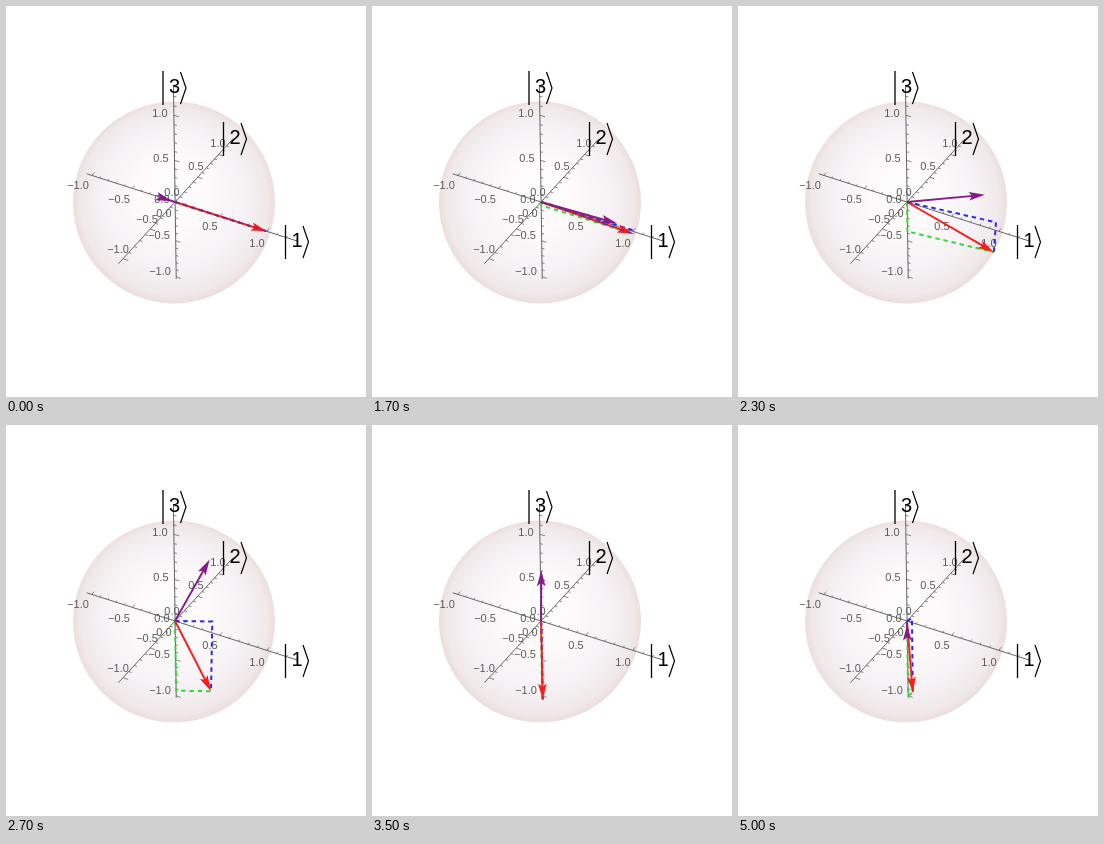
Recreate the animation shown at these times as an HTML page with a canvas. Size 360 by 391 pixels, loop 5.1 s.

```html
<!DOCTYPE html>
<html lang="en">
<head>
<meta charset="utf-8">
<title>State vector on a sphere</title>
<style>
html, body { margin: 0; width: 100%; height: 100%; overflow: hidden; background: #fff; }
canvas { display: block; }
</style>
</head>
<body>
<canvas id="stage" width="360" height="391"></canvas>
<script>
const ctx = document.getElementById('stage').getContext('2d');
const STEP_MS = 100, STEPS = 51;
const ORIGIN = [169, 196], SCALE = 99.5, DISTANCE = 8;
const FONT = '"Liberation Sans", Arial, sans-serif';

// Perspective view from the direction (1.3, -2.4, 2).
function project([x, y, z]) {
  const depth = 0.384 * x - 0.709 * y + 0.5905 * z;
  const k = SCALE / (1 - depth / DISTANCE);
  return [
    ORIGIN[0] + k * (0.879 * x + 0.476 * y) - 1.2 * z,
    ORIGIN[1] + k * (0.281 * x - 0.519 * y - 0.807 * z)
  ];
}

// Two Gaussian pulses drive a three-level system.
const stokes = n => Math.exp(-((n - 20) ** 2) / 50);
const pump = n => Math.exp(-((n - 30) ** 2) / 50);
const RATE = 2 * Math.PI / 5;

function slope(n, [x, y, z]) {
  const s = RATE * stokes(n), p = RATE * pump(n);
  return [-p * y, p * x + s * z, -s * y];
}

function advance(n, r, h) {
  const move = (d, f) => r.map((v, i) => v + d[i] * f);
  const a = slope(n, r);
  const b = slope(n + h / 2, move(a, h / 2));
  const c = slope(n + h / 2, move(b, h / 2));
  const d = slope(n + h, move(c, h));
  return r.map((v, i) => v + h / 6 * (a[i] + 2 * b[i] + 2 * c[i] + d[i]));
}

const states = [[1, 0, 0]];
for (let n = 0; n < STEPS - 1; n++) {
  let r = states[n];
  for (let j = 0; j < 20; j++) r = advance(n + j / 20, r, 1 / 20);
  states.push(r);
}

function stroke(points, color, width, dash = []) {
  ctx.beginPath();
  points.forEach(p => ctx.lineTo(p[0], p[1]));
  ctx.strokeStyle = color;
  ctx.lineWidth = width;
  ctx.setLineDash(dash);
  ctx.stroke();
  ctx.setLineDash([]);
}

function text(str, x, y, size, color) {
  ctx.font = size + 'px ' + FONT;
  ctx.textAlign = 'center';
  ctx.textBaseline = 'middle';
  ctx.fillStyle = color;
  ctx.fillText(str, x, y);
}

function drawSphere() {
  const g = ctx.createRadialGradient(166, 182, 0, 168, 196, 101);
  g.addColorStop(0, '#fefdfe');
  g.addColorStop(0.35, '#fcfafb');
  g.addColorStop(0.7, '#f6f2f5');
  g.addColorStop(0.92, '#f1e9ea');
  g.addColorStop(1, '#ebdfdd');
  ctx.fillStyle = g;
  ctx.beginPath();
  ctx.arc(168, 196.5, 101, 0, 2 * Math.PI);
  ctx.fill();
}

// Each label run lists the centres for -1.0, -0.5, 0.0, 0.5 and 1.0.
const AXES = [
  { dir: 0, tick: 1, from: -1.06, to: 1.32,
    labels: [[72, 179], [113, 193], [158, 207], [204, 220], [251, 237]] },
  { dir: 1, tick: 0, from: -1.08, to: 1.37,
    labels: [[112, 243], [141, 213], [166, 186], [190, 160], [212, 137]] },
  { dir: 2, tick: 0, from: -1.03, to: 1.3,
    labels: [[154, 265], [153, 229], [156, 193], [155, 152], [154, 107]] }
];

function drawAxis({ dir, tick, from, to, labels }) {
  const at = (v, off = 0) => {
    const p = [0, 0, 0];
    p[dir] = v;
    p[tick] += off;
    return project(p);
  };
  stroke([at(from), at(to)], '#666', 1);
  for (let i = -10; i <= to * 10; i++) {
    stroke([at(i / 10), at(i / 10, i % 5 ? 0.03 : 0.055)], '#666', 0.8);
  }
  labels.forEach(([x, y], i) => {
    const v = (i - 2) / 2;
    text((v < 0 ? '\u2212' : '') + Math.abs(v).toFixed(1), x, y + 0.5, 11, '#5a5a5a');
  });
}

function drawKet(name, x, y) {
  stroke([[x - 11.5, y - 16], [x - 11.5, y + 18]], '#000', 1.3);
  stroke([[x + 6, y - 15], [x + 11.5, y + 1], [x + 6, y + 17]], '#000', 1.2);
  text(name, x, y, 20, '#000');
}

function drawArrow(vec, color) {
  const HEAD = 16, HALF = 4.3;
  const tip = project(vec);
  const size = Math.hypot(...vec);
  const aim = project(vec.map(v => v / size));
  const far = size > 0.1 ? tip : aim;
  const angle = Math.atan2(far[1] - ORIGIN[1], far[0] - ORIGIN[0]);
  const len = Math.hypot(tip[0] - ORIGIN[0], tip[1] - ORIGIN[1]);
  const end = len < HEAD ? len - 3.5 * (1 - len / HEAD) : len;
  ctx.save();
  ctx.translate(ORIGIN[0], ORIGIN[1]);
  ctx.rotate(angle);
  stroke([[0, 0], [end - HEAD * 0.75, 0]], color, 1.9);
  ctx.fillStyle = color;
  ctx.beginPath();
  ctx.moveTo(end, 0);
  ctx.lineTo(end - HEAD, -HALF);
  ctx.lineTo(end - HEAD * 0.8, 0);
  ctx.lineTo(end - HEAD, HALF);
  ctx.fill();
  ctx.restore();
}

function drawProjections([x, y, z]) {
  const dash = [4.5, 3.8];
  const tip = project([x, y, z]);
  stroke([ORIGIN, project([0, 0, z]), tip], '#35d835', 2, dash);
  stroke([ORIGIN, project([x, y, 0]), tip], '#2c2ce6', 2, dash);
}

function render(n) {
  ctx.fillStyle = '#fff';
  ctx.fillRect(0, 0, 360, 391);
  drawSphere();
  AXES.forEach(drawAxis);
  drawProjections(states[n]);
  drawArrow(states[n], '#fb1c1c');
  if (Math.abs(states[n][2]) < 0.05) {
    stroke([ORIGIN, project(states[n])], '#5a2c9a', 1.1, [4.5, 3.8]);
  }
  drawArrow([stokes(n), 0, pump(n)], '#861c8a');
  drawKet('1', 291, 235);
  drawKet('2', 229, 132);
  drawKet('3', 168.5, 81);
}

const start = performance.now();
function loop() {
  render(Math.floor((performance.now() - start) / STEP_MS) % STEPS);
  requestAnimationFrame(loop);
}
loop();
</script>
</body>
</html>
```
